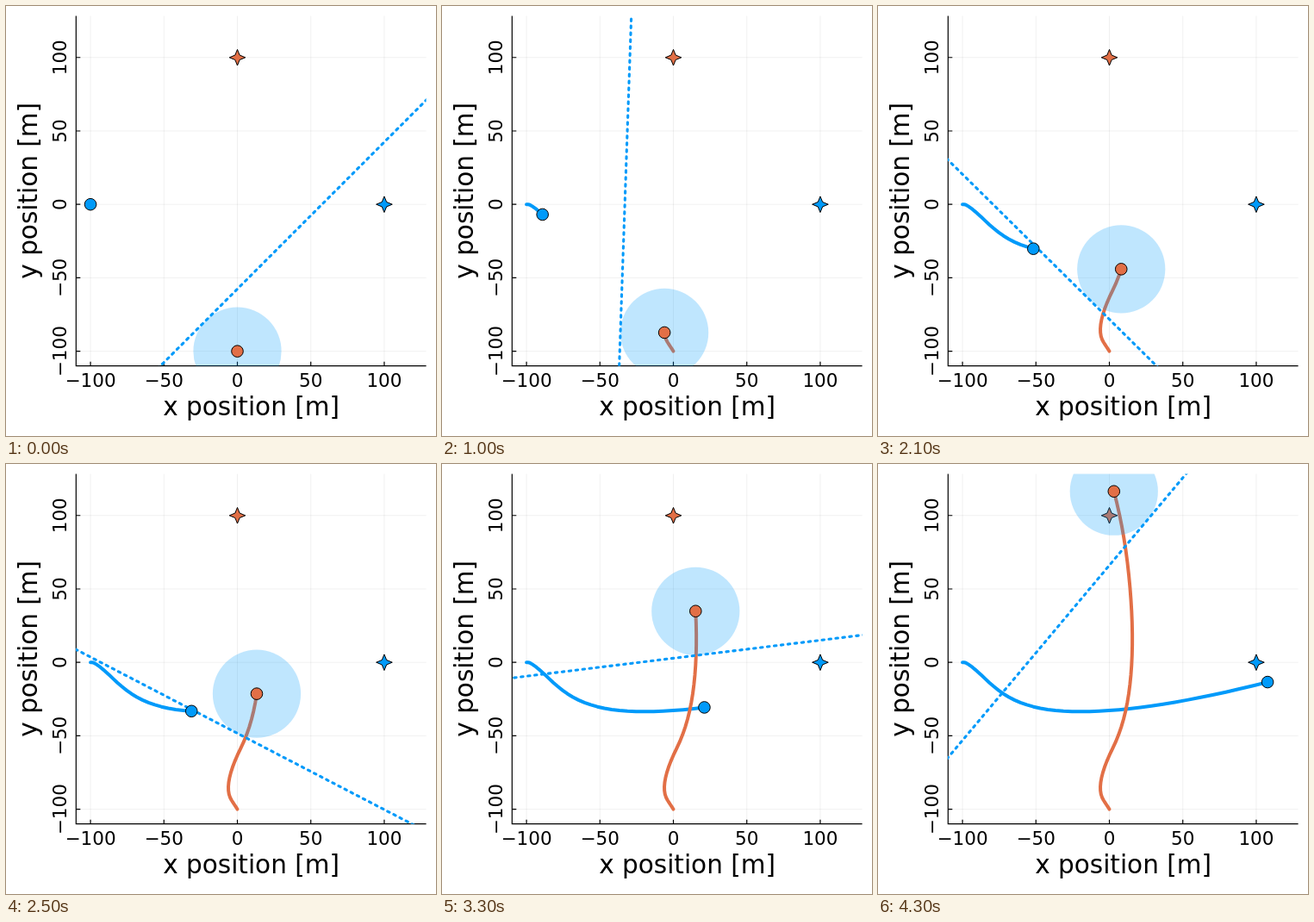
An HTML page that plays this animation: 499x499 px, repeating every 4400 ms.

```html
<!DOCTYPE html>
<html lang="en">
<head>
<meta charset="utf-8">
<title>Two agents and a rotating hyperplane</title>
<style>
  html, body { margin: 0; width: 100%; height: 100%; overflow: hidden; background: #fff; }
  svg { display: block; width: 100%; height: 100%; font-family: "DejaVu Sans", sans-serif; }
  .tick { font-size: 21.5px; text-anchor: middle; }
  .label { font-size: 29.5px; text-anchor: middle; }
  .trail { fill: none; stroke-width: 4; stroke-linecap: round; stroke-linejoin: round; }
  .mark { stroke: #000; stroke-width: 1; }
</style>
</head>
<body>
<svg viewBox="0 0 499 499">
  <clipPath id="area"><rect x="81" y="11.5" width="406.6" height="406.3"/></clipPath>
  <path id="grid" stroke="#000" stroke-opacity=".06" fill="none"/>
  <path id="axes" stroke="#000" stroke-width="1.2" fill="none"/>
  <g id="ticks"></g>
  <text class="label" x="284.6" y="475">x position [m]</text>
  <text class="label" transform="translate(36 214.3) rotate(-90)">y position [m]</text>
  <g clip-path="url(#area)">
    <path id="trailA" class="trail" stroke="#009AFA"/>
    <path id="trailB" class="trail" stroke="#E26F46"/>
    <path id="goalA" class="mark" fill="#009AFA"/>
    <path id="goalB" class="mark" fill="#E26F46"/>
    <circle id="zone" r="51.1" fill="#009AFA" fill-opacity=".25"/>
    <path id="plane" fill="none" stroke="#009AFA" stroke-width="3.1"
          stroke-linecap="round" stroke-dasharray="2.4 5.6"/>
    <circle id="dotA" class="mark" r="6.8" fill="#009AFA"/>
    <circle id="dotB" class="mark" r="6.8" fill="#E26F46"/>
  </g>
</svg>
<script>
const STEPS = 44, STEP_MS = 100, RADIUS = 51.1;
const $ = id => document.getElementById(id);
const set = (el, attrs) => { for (const k in attrs) el.setAttribute(k, attrs[k]); };
const px = u => 268.5 + 1.7045 * u;
const py = v => 230.2 - 1.7045 * v;

// Distance travelled under thrust; each kick [step, change] alters the acceleration
const travel = (t, kicks) =>
  kicks.reduce((sum, [from, k]) => sum + k * Math.max(0, t - from) ** 2 / 2, 0);

// Each agent speeds up towards its goal and swerves sideways around the other
const moveA = t => [
  px(-100) + travel(t, [[0, .372], [17, .03]]),
  py(0) + travel(t, [[3, .48], [12, -.48], [15, -.38], [25, .114]])
];
const moveB = t => [
  px(0) + travel(t, [[0, -.28], [7, .81], [18, -.867], [25, .063]]),
  py(-100) - travel(t, [[0, .434], [17, -.05], [36, -.63]])
];

const sample = move => Array.from({ length: STEPS }, (_, n) => move(n));
const pathA = sample(moveA), pathB = sample(moveB);

function addTick(text, attrs) {
  const el = document.createElementNS($("ticks").namespaceURI, "text");
  el.textContent = text;
  set(el, { class: "tick", ...attrs });
  $("ticks").append(el);
}

function drawAxes() {
  let grid = "", axes = "M81.3 11.5V417.7H487.6";
  for (let v = -100; v <= 100; v += 50) {
    const x = px(v), y = py(v), text = String(v).replace("-", "\u2212");
    grid += `M${x} 11.5V417.7M81.3 ${y}H487.6`;
    axes += `M${x} 417.7v-5M81.3 ${y}h5`;
    addTick(text, { x, y: 442.3 });
    addTick(text, { transform: `translate(70.3 ${y}) rotate(-90)` });
  }
  set($("grid"), { d: grid });
  set($("axes"), { d: axes });
}

function star(x, y) {
  const r = 9.3, k = 2.7;
  return `M${x} ${y - r}l${k} ${r - k} ${r - k} ${k} ${k - r} ${k} ${-k} ${r - k}` +
    ` ${-k} ${k - r} ${k - r} ${-k} ${r - k} ${-k}z`;
}

function drawAgent(name, path, n) {
  const [cx, cy] = path[n];
  set($("dot" + name), { cx, cy });
  set($("trail" + name), { d: "M" + path.slice(0, n + 1).join("L") });
}

function draw(n) {
  drawAgent("A", pathA, n);
  drawAgent("B", pathB, n);
  const [cx, cy] = pathB[n];
  set($("zone"), { cx, cy });
  // Tangent to the zone, its normal turning at a steady rate
  const a = (135 + 185 * n / (STEPS - 1)) * Math.PI / 180;
  const c = Math.cos(a), s = Math.sin(a), len = 600;
  const x = cx + RADIUS * c, y = cy - RADIUS * s;
  set($("plane"), { d: `M${x - len * s} ${y - len * c}L${x + len * s} ${y + len * c}` });
}

drawAxes();
set($("goalA"), { d: star(px(100), py(0)) });
set($("goalB"), { d: star(px(0), py(100)) });

const start = performance.now();
function tick() {
  draw(Math.floor((performance.now() - start) / STEP_MS) % STEPS);
  requestAnimationFrame(tick);
}
tick();
</script>
</body>
</html>
```
